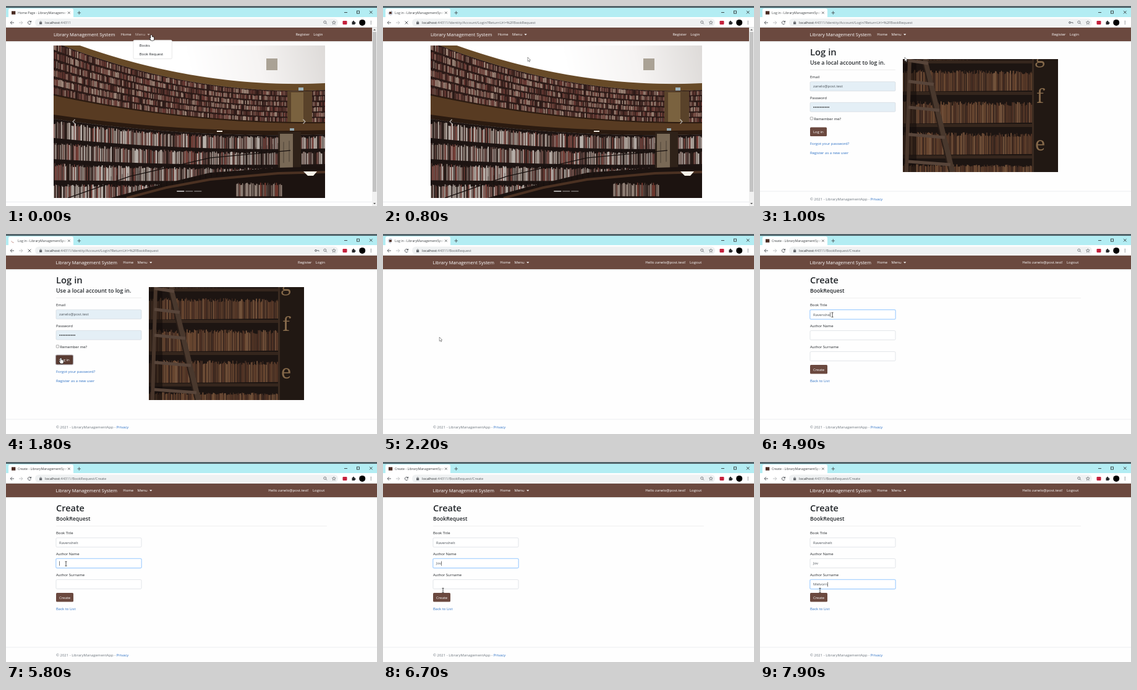
Recreate the animation shown at these times as an HTML page with a canvas. Size 600x324 px, loop 8000 ms.

```html
<!DOCTYPE html>
<html lang="en">
<head>
<meta charset="utf-8">
<title>Library Management System</title>
<style>
html, body { margin: 0; width: 100%; height: 100%; overflow: hidden; background: #fefefe; }
canvas { display: block; width: 600px; height: 324px; }
</style>
</head>
<body>
<canvas id="stage"></canvas>
<script>
const W = 600, H = 324, LOOP = 8000;
const FONT = '"Open Sans", "Noto Sans", sans-serif';
const BROWN = '#6b493f', INK = '#212529', LINK = '#2a6fc4', BODY = 5.98;
const MAIL = 'zanelo@post.test';

const canvas = document.getElementById('stage');
const dpr = Math.max(1, window.devicePixelRatio || 1);
canvas.width = W * dpr;
canvas.height = H * dpr;
const page = canvas.getContext('2d');
page.scale(dpr, dpr);
let c = page;

function text(s, x, y, size = BODY, color = INK, weight = 400, align = 'left') {
  c.font = `${weight} ${size}px ${FONT}`;
  c.fillStyle = color;
  c.textAlign = align;
  c.fillText(s, x, y);
  return c.measureText(s).width;
}
function rect(x, y, w, h, color) {
  c.fillStyle = color;
  c.fillRect(x, y, w, h);
}
function box(x, y, w, h, r, fill, stroke, lw = 0.5) {
  c.beginPath();
  c.roundRect(x, y, w, h, r);
  if (fill) { c.fillStyle = fill; c.fill(); }
  if (stroke) { c.strokeStyle = stroke; c.lineWidth = lw; c.stroke(); }
}
function trace(pts) {
  c.beginPath();
  for (let i = 0; i < pts.length; i += 2) c.lineTo(pts[i], pts[i + 1]);
}
function line(pts, color, lw = 0.8) {
  trace(pts);
  c.strokeStyle = color;
  c.lineWidth = lw;
  c.stroke();
}
function poly(pts, color) {
  trace(pts);
  c.fillStyle = color;
  c.fill();
}
function arc(x, y, r, a, b, color, lw) {
  c.beginPath();
  c.arc(x, y, r, a, b);
  c.strokeStyle = color;
  c.lineWidth = lw;
  c.stroke();
}
function disc(x, y, r, color) {
  c.beginPath();
  c.arc(x, y, r, 0, 7);
  c.fillStyle = color;
  c.fill();
}

// ---- still pictures, painted once ----
function randomizer(seed) {
  return () => (seed = (seed * 16807) % 2147483647) / 2147483647;
}
function picture(x, y, w, h, paint) {
  const k = 2 * dpr, pic = document.createElement('canvas');
  pic.width = w * k;
  pic.height = h * k;
  c = pic.getContext('2d');
  c.scale(k, k);
  c.translate(-x, -y);
  paint();
  c = page;
  return () => c.drawImage(pic, x, y, w, h);
}
// Parabola through the left, middle and right heights of the hall
const edge = (a, b, d) => x => {
  const u = (x - 77) / 439;
  return a * (2 * u - 1) * (u - 1) + b * 4 * u * (1 - u) + d * u * (2 * u - 1);
};
function band(top, bottom, color) {
  const pts = [];
  for (let x = 77; x <= 517; x += 10) pts.push(x, top(x));
  for (let x = 517; x >= 77; x -= 10) pts.push(x, bottom(x));
  poly(pts, color);
}
function books(x0, x1, top, bottom, rows, colors, rnd) {
  for (let r = 0; r < rows; r++) {
    for (let x = x0; x < x1;) {
      const w = 0.7 + rnd() * 1.3, t = top(x), step = (bottom(x) - t) / rows;
      const tall = step * (0.66 + rnd() * 0.16);
      rect(x, t + step * (r + 0.9) - tall, w, tall, colors[Math.floor(rnd() * colors.length)]);
      x += w + 0.15;
    }
  }
}

const hall = picture(77, 64, 439, 247, () => {
  const rnd = randomizer(71);
  const g = c.createLinearGradient(300, 110, 516, 64);
  g.addColorStop(0, '#ffffff');
  g.addColorStop(0.5, '#f6f4f3');
  g.addColorStop(1, '#dedbd9');
  rect(77, 64, 439, 247, g);
  rect(421, 85, 18, 19, '#aaa295');

  const cornice = edge(48, 111, 125), wall = edge(58, 122, 136);
  const ledge = edge(144, 179, 189), under = edge(181, 203, 206);
  const floor = edge(320, 313, 309), low = x => under(x) + 2;
  band(cornice, wall, '#674a28');
  band(wall, ledge, '#2b1a17');
  books(77, 516, wall, ledge, 6, ['#6c3a34', '#8f7468', '#452722', '#a58e80', '#573630', '#2f1c19', '#7b5148'], rnd);
  rect(455, 138, 40, 51, '#59422a');
  rect(461, 140, 20, 48, '#7a623f');
  rect(473, 132, 8, 5, '#9fb4bb');
  band(ledge, under, '#583b22');
  band(x => ledge(x) - 1, x => ledge(x) + 1, '#2b1b10');
  band(x => under(x) - 5, x => under(x) + 2, '#2a1a10');
  band(low, () => 312, '#1d1412');
  books(77, 516, low, floor, 4, ['#b5aaa2', '#8e8078', '#4f3a36', '#c8c0ba', '#70504a', '#2a1d19', '#7c433c'], rnd);
  rect(440, 204, 37, 60, '#2f2219');
  rect(443, 207, 21, 56, '#796956');
  rect(459, 198, 7, 4, '#93a6ac');
  poly([165, 312, 235, 293, 330, 270, 440, 262, 517, 260, 517, 312], '#1c1310');
  line([195, 311, 260, 294, 330, 281, 440, 271, 517, 269], '#4b3122', 4);
  books(372, 446, () => 284, () => 311, 1, ['#6d5a52', '#98887e', '#3a2c27', '#74392f'], rnd);
  for (let x = 170; x < 460; x += 9) {
    const y = 300 - (x - 170) * 0.2;
    line([x, y - 24, x, y + 10], 'rgba(12,8,7,.7)', 0.6);
  }
  line([100, 311, 200, 276, 330, 246, 460, 234], '#17100e', 1.3);
  poly([481, 268, 503, 268, 497, 275, 488, 275], '#f7f1e8');
  rect(341, 202, 9, 2, '#eee6dc');
});

const shelves = picture(231, 86, 251, 183, () => {
  const rnd = randomizer(29);
  rect(231, 86, 251, 183, '#1d1512');
  const tones = ['#5b3d2b', '#6f4b33', '#4a3125', '#3b2820', '#7a583f', '#553526'];
  [[86, 92], [99, 143], [150, 195], [200, 246], [253, 282]].forEach(([a, b]) => {
    books(231, 440, x => a + (x - 231) * 0.012, x => b - (x - 231) * 0.01, 1, tones, rnd);
    rect(231, b - 4, 209, 5, '#35261d');
  });
  rect(231, 86, 22, 183, 'rgba(18,12,10,.55)');
  rect(440, 86, 42, 183, '#211813');
  rect(440, 86, 3, 183, '#3a2a20');
  c.font = '31px "Noto Serif", serif';
  c.fillStyle = '#85694a';
  c.textAlign = 'center';
  ['g', 'f', 'e'].forEach((s, i) => c.fillText(s, 453, [92, 157, 234][i]));
  line([242, 86, 237, 269], '#48362b', 6);
  line([266, 86, 311, 269], '#49382d', 9);
  line([262, 86, 306, 269], '#2a1e18', 2);
  [88, 122, 164, 208, 252].forEach((y, i) => line([240, y, 272 + i * 9, y + 5], '#58453a', 5));
});

// ---- browser frame ----
function magnifier(x, y) {
  arc(x, y, 2, 0, 7, '#5f6368', 0.8);
  line([x + 1.5, y + 1.5, x + 3.2, y + 3.2], '#5f6368', 0.9);
}
function star(x, y) {
  const pts = [];
  for (let i = 0; i <= 10; i++) {
    const a = i * Math.PI / 5 - Math.PI / 2, r = i % 2 ? 1.4 : 3.1;
    pts.push(x + r * Math.cos(a), y + r * Math.sin(a));
  }
  line(pts, '#5f6368', 0.7);
}
function browser(t, s) {
  rect(0, 0, W, 3, '#53656b');
  rect(0, 3, W, 15, '#b3edf3');
  box(4, 4, 105, 16, [3, 3, 0, 0], '#ffffff');
  rect(0, 18, W, 17, '#ffffff');
  rect(0, 34.2, W, 0.8, '#d9dbdd');

  const spin = t / 160;
  if (s.tab === 'wait') arc(12, 11, 3, -spin, 1.8 - spin, '#b9857d', 0.8);
  else if (s.tab === 'fill') {
    arc(12, 11, 3.3, spin, spin + 4.6, '#8398b5', 0.8);
    rect(10, 9.4, 4, 3.4, '#4a2b23');
  } else if (s.tab === 'small') rect(10, 9.4, 4, 3.4, '#4a2b23');
  else rect(9, 8.3, 6.3, 5.4, '#4a2b23');

  c.save();
  c.beginPath();
  c.rect(18, 4, 79.5, 14);
  c.clip();
  text(s.title + ' - LibraryManagementSystem', 19, 12.9, 5.25, '#3c4043');
  const fade = c.createLinearGradient(91, 0, 98, 0);
  fade.addColorStop(0, 'rgba(255,255,255,0)');
  fade.addColorStop(1, '#ffffff');
  rect(91, 5, 8, 12, fade);
  c.restore();
  line([100, 9.2, 103.6, 12.8], '#3c4043', 0.7);
  line([103.6, 9.2, 100, 12.8], '#3c4043', 0.7);
  line([115.5, 11, 121, 11], '#3c4043');
  line([118.25, 8.2, 118.25, 13.8], '#3c4043');
  line([547, 10.5, 552, 10.5], '#222');
  c.strokeRect(567.5, 8, 4, 4);
  line([588, 7.8, 592.6, 12.4], '#222');
  line([592.6, 7.8, 588, 12.4], '#222');

  line([13, 27, 7.2, 27], '#4d5156', 0.9);
  line([9.8, 24.3, 7.1, 27, 9.8, 29.7], '#4d5156', 0.9);
  line([21, 27, 26.8, 27], '#b8babd', 0.9);
  line([24.2, 24.3, 26.9, 27, 24.2, 29.7], '#b8babd', 0.9);
  if (s.busy) {
    line([35.6, 24.6, 40.4, 29.4], '#4d5156', 0.9);
    line([40.4, 24.6, 35.6, 29.4], '#4d5156', 0.9);
  } else {
    arc(38, 27, 2.6, 0.4, 5.4, '#4d5156', 0.9);
    poly([41, 23.6, 41, 26.6, 38, 26.6], '#4d5156');
  }

  box(47, 20.5, 490, 12.5, 6.2, '#eff1f2');
  rect(54, 26.2, 4.2, 3.3, '#5f6368');
  arc(56.1, 26, 1.3, Math.PI, 0, '#5f6368', 0.7);
  const w = text('localhost', 63, 29, 5.75, '#2b2e31');
  text(':44311' + s.path, 63 + w, 29, 5.75, '#62666a');
  if (s.key) {
    arc(501, 26.8, 1.4, 0, 7, '#5f6368', 1);
    line([502.4, 26.8, 506, 26.8, 506, 28.3], '#5f6368', 0.9);
  }
  magnifier(515.8, 26.2);
  star(530.3, 27);
  box(544.5, 24, 7, 6, 1.2, '#c4213c');
  box(559.5, 25.3, 4.8, 4.8, 0.6, '#26282b');
  disc(562, 24.9, 1.1, '#26282b');
  disc(564.6, 27.6, 1.1, '#26282b');
  disc(576.2, 26.9, 5, '#000');
  for (let i = -1; i < 2; i++) disc(590.3, 26.9 + i * 2.2, 0.65, '#4d5156');
}

function navbar(dx, signedIn, menuOpen) {
  const right = dx ? W : 592;
  const shade = c.createLinearGradient(0, 57, 0, 60);
  shade.addColorStop(0, 'rgba(0,0,0,.09)');
  shade.addColorStop(1, 'rgba(0,0,0,0)');
  rect(0, 57, right, 3, shade);
  rect(0, 35, right, 22, BROWN);
  text('Library Management System', 77 + dx, 49, 7.46, '#fff');
  text('Home', 185.7 + dx, 48.4, BODY, '#fff');
  const ink = menuOpen ? '#cfc0bb' : '#fff';
  text('Menu', 209 + dx, 48.4, BODY, ink);
  poly([228.5 + dx, 45.2, 232.7 + dx, 45.2, 230.6 + dx, 47.4], ink);
  if (signedIn) {
    text(`Hello ${MAIL}!`, 489.5, 48.2, BODY, '#fff', 400, 'right');
    text('Logout', 496, 48.4, BODY, '#fff');
  } else {
    text('Register', 468.4 + dx, 48.4, BODY, '#fff');
    text('Login', 497.2 + dx, 48.4, BODY, '#fff');
  }
}
function footer() {
  rect(0, 299.8, W, 0.6, '#dee2e6');
  const w = text('© 2021 - LibraryManagementApp - ', 81, 315, BODY, '#6c757d');
  text('Privacy', 81 + w, 315, BODY, LINK);
}

// ---- pages ----
function home(t) {
  hall();
  line([111.5, 183.7, 108.2, 187.3, 111.5, 190.9], 'rgba(255,255,255,.6)', 1.4);
  line([480.5, 183.7, 483.8, 187.3, 480.5, 190.9], 'rgba(255,255,255,.6)', 1.4);
  for (let i = 0; i < 3; i++) rect(276.3 + i * 14, 299.5, 12, 1.2, i ? 'rgba(255,255,255,.5)' : '#fff');
  rect(0, 317, 592, 0.6, '#dee2e6');
  rect(592, 35, 8, 289, '#f1f1f1');
  rect(593, 42, 6, 259, '#c3c3c3');
  poly([594, 39.5, 596, 37.3, 598, 39.5], '#555');
  poly([594, 319, 596, 321.2, 598, 319], '#555');
  const open = t < 500;
  navbar(0, false, open);
  if (open) {
    box(206, 55.2, 62.4, 30.4, 1.6, '#fff', '#cfcfcf');
    if (t >= 200) rect(206.4, 71.5, 61.6, 11.5, '#f3f4f5');
    text('Books', 215.7, 66.4);
    text('Book Request', 215.7, 79.5);
  }
}
function field(y, value, focus, fill = '#fff') {
  if (focus) box(80.2, y - 0.8, 139.6, 16.6, 2.2, '#bfdeff');
  box(81, y, 138, 15, 1.6, fill, focus ? '#80bdff' : '#ced4da', 0.6);
  const w = text(value, 86, y + 9.7, BODY, '#495057');
  if (focus) rect(86.2 + w, y + 4, 0.6, 7.4, '#222');
}
function button(label, y, w, color) {
  box(81, y, w, 14.6, 1.6, color);
  text(label, 86, y + 9.5, BODY, '#fff');
}
function login(t) {
  navbar(3.6, false, false);
  text('Log in', 81, 79.6, 14.8, INK, 600);
  text('Use a local account to log in.', 81, 95, 8.9, INK, 600);
  rect(81, 103.4, 138, 0.6, '#e3e3e3');
  text('Email', 81, 117);
  field(122.7, MAIL, false, '#e4eff6');
  text('Password', 81, 151);
  field(156.3, '', false, '#e4eff6');
  for (let i = 0; i < 10; i++) disc(87.2 + i * 2.66, 163.9, 0.85, '#222');
  box(81.3, 180, 4.3, 4.3, 0.6, '#fff', '#767676', 0.6);
  text('Remember me?', 87.2, 184.5);
  if (t >= 1700) box(79.8, 195.4, 29.4, 16.8, 2.4, '#a9a3a8');
  button('Log in', 196.5, 27, t >= 1600 ? '#5a3c33' : BROWN);
  text('Forgot your password?', 81, 225, BODY, LINK);
  text('Register as a new user', 81, 240.2, BODY, LINK);
  shelves();
  footer();
}
function typed(word, t, start, step) {
  return t < start ? '' : word.slice(0, Math.floor((t - start) / step) + 1);
}
function create(t) {
  navbar(3.6, true, false);
  text('Create', 81, 79.8, 14.5, INK, 600);
  text('BookRequest', 81, 95.2, 8.7, INK, 600);
  rect(81, 103.6, 438, 0.6, '#e3e3e3');
  text('Book Title', 81, 117.4);
  field(122.9, typed('Ravenshelt', t, 4400, 70), t >= 4200 && t < 5700);
  text('Author Name', 81, 151.3);
  field(156.6, typed('Jov', t, 6200, 150), t >= 5700 && t < 7000);
  text('Author Surname', 81, 185.2);
  field(190.6, typed('Melvorn', t, 7300, 90), t >= 7000);
  button('Create', 212, 28, BROWN);
  text('Back to List', 81, 240.4, BODY, LINK);
  footer();
}

// ---- pointer ----
const PATH = [
  [0, 235, 47], [300, 234, 75], [700, 234, 83], [1000, 234, 83], [1600, 88.5, 201],
  [1900, 88.5, 201], [2700, 97, 93.5], [3600, 97, 93.5], [4200, 117, 131], [4900, 117, 131],
  [5400, 100, 147], [5700, 97, 164], [6200, 97, 172], [6600, 97, 208], [8000, 97, 208]
];
function pointer(t) {
  const i = PATH.findIndex(p => p[0] > t);
  const [t0, x0, y0] = PATH[i - 1], [t1, x1, y1] = PATH[i];
  const u = (t - t0) / (t1 - t0), e = u * u * (3 - 2 * u);
  const hand = t < 600 || (t >= 1600 && t < 2200) || (t >= 2600 && t < 3700);
  c.save();
  c.translate(x0 + (x1 - x0) * e, y0 + (y1 - y0) * e);
  c.lineJoin = 'round';
  if (hand) {
    c.beginPath();
    c.roundRect(-0.8, 0, 1.9, 6, 0.9);
    c.roundRect(-1, 3.2, 5.2, 5.6, 1.4);
    c.strokeStyle = '#111';
    c.lineWidth = 1.2;
    c.stroke();
    line([-2.6, 5, 0, 8], '#111', 2);
    c.beginPath();
    c.roundRect(-0.8, 0, 1.9, 6, 0.9);
    c.roundRect(-1, 3.2, 5.2, 5.6, 1.4);
    c.fillStyle = '#fff';
    c.fill();
    line([-2.4, 5, 0, 7.8], '#fff', 1);
  } else if (t >= 3700) {
    line([-1.6, -3.6, 1.6, -3.6], '#222', 0.7);
    line([0, -3.6, 0, 3.6], '#222', 0.8);
    line([-1.6, 3.6, 1.6, 3.6], '#222', 0.7);
  } else {
    const shape = [0, 0, 0, 6.6, 1.5, 5.3, 2.5, 7.6, 3.6, 7.1, 2.6, 4.9, 4.6, 4.8, 0, 0];
    poly(shape, '#fff');
    line(shape, '#333', 0.5);
  }
  c.restore();
}

function view(t) {
  const s = { title: 'Create', path: '/BookRequest/Create', tab: 'done', busy: false, key: false, draw: create };
  if (t < 900) {
    const next = t >= 700;
    s.draw = home;
    s.title = next ? 'Log in' : 'Home Page';
    s.path = next ? '/Identity/Account/Login?ReturnUrl=%2FBookRequest' : '';
    s.tab = next ? 'fill' : t >= 400 ? 'wait' : 'done';
    s.busy = t >= 400;
  } else if (t < 2200) {
    s.draw = login;
    s.title = 'Log in';
    s.path = '/Identity/Account/Login?ReturnUrl=%2FBookRequest';
    s.key = t >= 1000;
    s.busy = t < 1000 || t >= 1700;
    s.tab = t >= 1700 ? 'wait' : t < 1000 ? 'fill' : 'done';
  } else if (t < 3000) {
    s.draw = () => { navbar(3.6, true, false); footer(); };
    s.title = 'Log in';
    s.path = '/BookRequest';
    s.tab = 'fill';
  } else if (t < 3200) s.tab = 'small';
  return s;
}

function frame(now) {
  const t = Math.floor((now % LOOP) / 100) * 100;
  const s = view(t);
  rect(0, 0, W, H, '#fefefe');
  s.draw(t);
  browser(t, s);
  pointer(t);
  requestAnimationFrame(frame);
}
requestAnimationFrame(frame);
</script>
</body>
</html>
```
